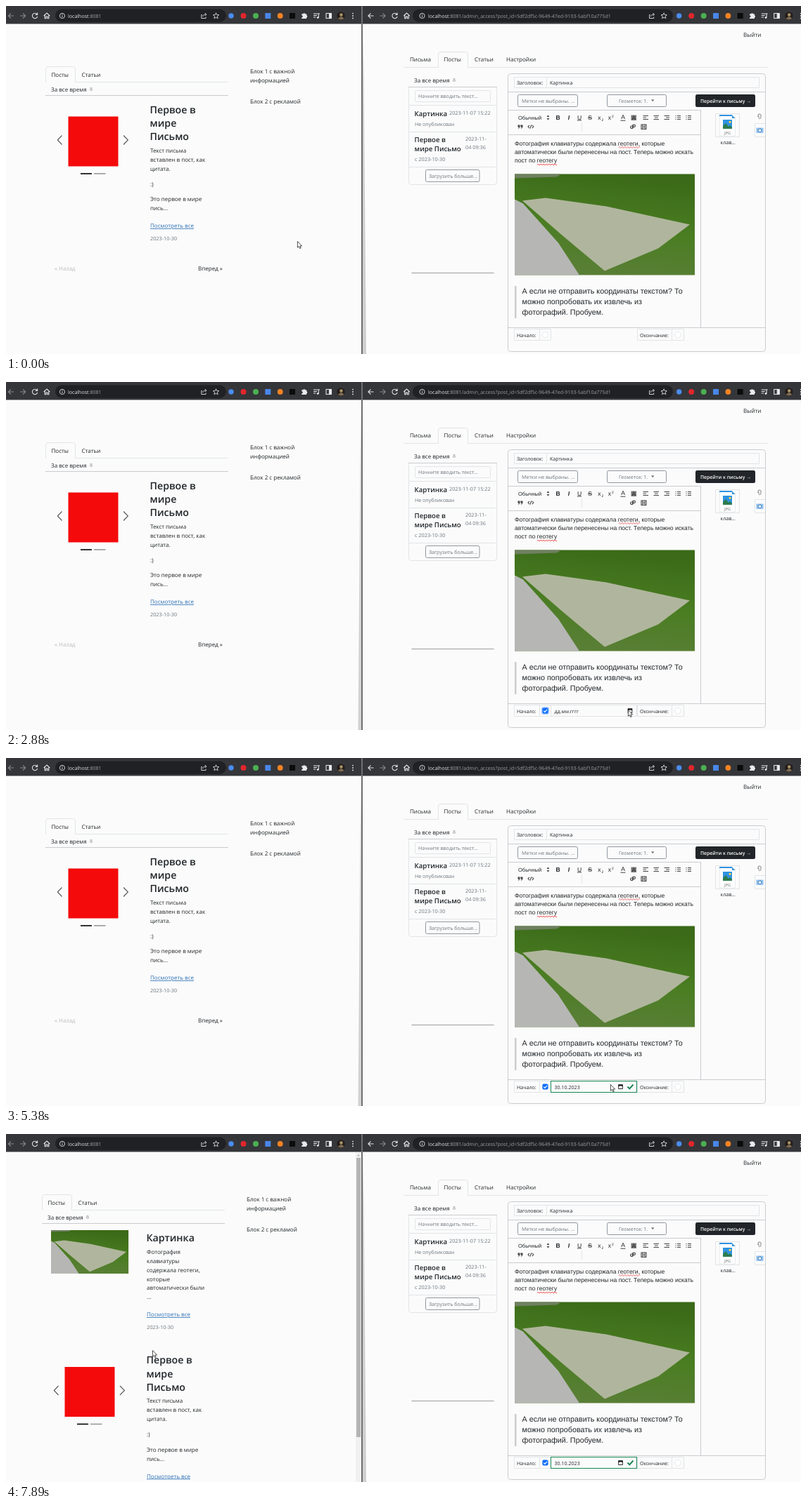
Write an HTML page that moves like this. It is 1130x496 px and loops after 8 s.

```html
<!DOCTYPE html>
<html lang="ru">
<head>
<meta charset="utf-8">
<title>Отложенная публикация</title>
<style>
html, body { margin: 0; width: 100%; height: 100%; overflow: hidden; background: #fbfbfb; }
svg { display: block; width: 1130px; height: 496px; }
text { font: 8.05px "Open Sans", "Noto Sans", sans-serif; fill: #212529; text-rendering: geometricPrecision; white-space: pre; }
.s, .s text { font-size: 7.1px; }
.d { font-size: 7.3px; }
text.g { fill: #6c757d; }
text.off { fill: #b9bcc0; }
.h1 { font-size: 14.2px; font-weight: 600; }
.h2 { font-size: 9.7px; font-weight: 600; }
.link { fill: #2a6fb5; text-decoration: underline; }
.url { font-size: 7.05px; fill: #e8eaed; }
.url tspan { fill: #9aa0a6; }
.dark { font-size: 6.9px; font-weight: 600; fill: #fff; }
.ed { font: 8.6px "Liberation Sans", Arial, sans-serif; }
.q { font: 10.8px "Liberation Sans", Arial, sans-serif; }
.fmt { font-size: 7.5px; }
.sub { font-size: 5px; }
.cal text { font: 6.5px "Liberation Sans", Arial, sans-serif; fill: #111; }
.cal .b { font-weight: 700; }
.cal .act { fill: #1a73e8; }
.mid { text-anchor: middle; }
.ln { fill: none; stroke: #e1e4e8; }
.ln2 { fill: none; stroke: #c9ccd0; }
.btn { fill: none; stroke: #868e96; stroke-width: .9; }
.ic { fill: none; stroke: #dfe1e5; stroke-width: 1.1; }
.thin { stroke-width: .9; }
.dim { stroke: #85888c; }
.tb { fill: none; stroke: #444; stroke-width: 1.1; }

/* every change is a hard step on one 8 s clock */
.cursor, .grid, .flip, .shift, .rightOn, .leftOn, .checked, .ring, .empty, .popup, .done,
.oct, .nov, .loading, .idle, .before, .after { animation: 8s step-end infinite; }
.leftOn { animation-name: leftOn; }
.rightOn { animation-name: rightOn; }
.checked { animation-name: checked; }
.ring { animation-name: ring; }
.empty { animation-name: empty; }
.popup { animation-name: popup; }
.done { animation-name: done; }
.oct { animation-name: oct; }
.nov { animation-name: nov; }
.loading { animation-name: loading; }
.idle { animation-name: idle; }
.before { animation-name: before; }
.after { animation-name: after; }
.shift { animation-name: shift; }
.grid { animation-name: scroll; }
.cal .flip { animation-name: flip; }
.cursor { animation-name: move; }
@keyframes leftOn { 0% { opacity: 1 } 18.125% { opacity: 0 } 77.375%, 100% { opacity: 1 } }
@keyframes rightOn { 0% { opacity: 0 } 18.125% { opacity: 1 } 77.375%, 100% { opacity: 0 } }
@keyframes checked { 0% { opacity: 0 } 18.125%, 100% { opacity: 1 } }
@keyframes ring { 0% { opacity: 0 } 18.125% { opacity: 1 } 39.125%, 100% { opacity: 0 } }
@keyframes empty { 0% { opacity: 0 } 18.125% { opacity: 1 } 64.25%, 100% { opacity: 0 } }
@keyframes popup { 0% { opacity: 0 } 39.125% { opacity: 1 } 64.25%, 100% { opacity: 0 } }
@keyframes done { 0% { opacity: 0 } 64.25%, 100% { opacity: 1 } }
@keyframes nov { 0% { opacity: 1 } 56.375%, 100% { opacity: 0 } }
@keyframes oct { 0% { opacity: 0 } 56.375%, 100% { opacity: 1 } }
@keyframes loading { 0% { opacity: 0 } 84% { opacity: 1 } 93.375%, 100% { opacity: 0 } }
@keyframes idle { 0% { opacity: 1 } 84% { opacity: 0 } 93.375%, 100% { opacity: 1 } }
@keyframes before { 0% { opacity: 1 } 85.5%, 100% { opacity: 0 } }
@keyframes after { 0% { opacity: 0 } 91.875%, 100% { opacity: 1 } }
@keyframes shift { 0% { transform: none } 91.875%, 100% { transform: translate(-5px, 0) } }
@keyframes flip { 0% { fill: var(--a) } 56.375%, 100% { fill: var(--b) } }
@keyframes scroll {
  0% { transform: translate(0, 0) } 56.375% { transform: translate(0, 22.5px) }
  58.25% { transform: translate(0, 60px) } 59.75%, 100% { transform: translate(0, 75.75px) }
}
@keyframes move {
  0% { transform: translate(414px, 335px) }
  1.875% { transform: translate(398px, 324px) }
  3.75% { transform: translate(396px, 321px) }
  5.25% { transform: translate(487px, 343px) }
  7.125% { transform: translate(540px, 366px) }
  8.625% { transform: translate(618px, 401px) }
  10.125% { transform: translate(690px, 436px) }
  11.625% { transform: translate(742px, 460px) }
  13.125% { transform: translate(768px, 468px) }
  21.5% { transform: translate(781px, 468px) }
  23% { transform: translate(803px, 468px) }
  24.875% { transform: translate(850px, 468px) }
  26.375% { transform: translate(872px, 468px) }
  27.875% { transform: translate(882px, 467px) }
  29.375% { transform: translate(884px, 467px) }
  43.875% { transform: translate(878px, 456px) }
  45.375% { transform: translate(850px, 420px) }
  46.875% { transform: translate(815px, 382px) }
  48.375% { transform: translate(795px, 364px) }
  49.875% { transform: translate(789px, 360px) }
  53.25% { transform: translate(789px, 358px) }
  61.25% { transform: translate(788px, 400px) }
  62.75% { transform: translate(786px, 427px) }
  65.75% { transform: translate(826px, 452px) }
  67.25% { transform: translate(859px, 465px) }
  68.75% { transform: translate(861px, 465px) }
  70.625% { transform: translate(744px, 440px) }
  72.125% { transform: translate(609px, 401px) }
  73.875% { transform: translate(520px, 362px) }
  75.5% { transform: translate(445px, 338px) }
  87% { transform: translate(440px, 338px) }
  88.5% { transform: translate(433px, 338px) }
  90.375% { transform: translate(431px, 337px) }
  94.875% { transform: translate(428px, 335px) }
  96.75% { transform: translate(284px, 316px) }
  98.625%, 100% { transform: translate(208px, 308px) }
}
</style>
</head>
<body>
<svg viewBox="0 0 1130 496">
<defs>
  <linearGradient id="hill" x1=".3" y1="1" x2=".5" y2="0">
    <stop offset="0" stop-color="#5b7f38"/><stop offset=".5" stop-color="#4a7d22"/><stop offset="1" stop-color="#3b6a18"/>
  </linearGradient>
  <clipPath id="days"><rect x="778" y="348" width="112" height="91"/></clipPath>
  <clipPath id="card"><rect x="988" y="149" width="91" height="60"/></clipPath>
  <path id="back" d="M11 14H3.5M7 10.3L3.3 14 7 17.7"/>
  <path id="fwd" d="M20 14H27.5M24 10.3L27.7 14 24 17.7"/>
  <path id="reload" d="M44 11.6A3.7 3.7 0 1 0 44.7 14.8M44.6 9.6V12.4H41.8"/>
  <path id="home" d="M53.8 14L58 10l4.2 4M55.2 13V17.8H57V15H59V17.8H60.8V13"/>
  <g id="info" class="thin"><circle cx="80" cy="14" r="3.6"/><path d="M80 13.4V16M80 11.6V12.6"/></g>
  <g id="tools">
    <path class="ic thin" d="M279 12.5H277.8V17.5H284V15.5M279.7 15Q280 12 284.5 12M282.8 10l2 2-2 2"/>
    <path class="ic thin" d="M298.5 9.8l1.2 2.7 2.9.3-2.2 2 .7 2.9-2.6-1.5-2.6 1.5.7-2.9-2.2-2 2.9-.3z"/>
    <circle cx="320" cy="14" r="3.7" fill="#4a8df0"/>
    <circle cx="337.5" cy="14" r="4" fill="#e0262d"/>
    <circle cx="355" cy="14" r="4" fill="#4caf50"/>
    <rect x="368.3" y="10" width="8" height="8" fill="#4a86e8"/>
    <circle cx="389.7" cy="14" r="3.9" fill="#f58220"/>
    <rect x="403" y="10" width="8" height="8" fill="#0b0b0b"/>
    <path fill="#e8eaed" d="M420.3 11.3H422.3A1.6 1.6 0 0 1 425.3 11.3H427.2V13.3A1.5 1.5 0 0 1 427.2 16.2V18H420.3V16.2A1.5 1.5 0 0 0 420.3 13.2Z"/>
    <path class="ic" d="M437 11H444M437 13.5H442M437 16H440.5M444.3 16.5V11H446"/><circle cx="443.3" cy="16.6" r="1.4" fill="#e8eaed"/>
    <rect class="ic" x="455" y="10.5" width="7.5" height="7"/><path fill="#e8eaed" d="M459 10.5H463V17.5H459z"/>
    <circle cx="476" cy="14" r="5.6" fill="#221c16"/><circle cx="476.5" cy="12.6" r="2.3" fill="#a88f6c"/><path fill="#7d6b52" d="M472 17.8Q476.5 13 480.5 17.5Q476.5 21.5 472 17.8Z"/>
    <g fill="#e8eaed"><circle cx="493" cy="10.6" r=".9"/><circle cx="493" cy="14" r=".9"/><circle cx="493" cy="17.4" r=".9"/></g>
  </g>
  <path id="down" fill="none" stroke="#888" stroke-width=".6" d="M-.8 0H.8V2.5H2L0 4.6-2 2.5H-.8Z"/>
  <g id="photo">
    <path fill="url(#hill)" d="M0 0H256V144H0z"/>
    <path fill="#6f8060" d="M0 0H66L60 4 0 6z"/>
    <path fill="#b6b7b4" d="M0 36L12 42 62 98 92 144H0z"/>
    <path fill="#b0b69d" d="M11 38L44 34 130 46 249 72 204 106 128 138 66 86z"/>
  </g>
  <g id="calIcon"><rect x="-2.8" y="-2.3" width="5.6" height="5.2" fill="none" stroke="#111" stroke-width=".9"/><path fill="#111" d="M-3.2-3.2H3.2V-1H-3.2z"/></g>
  <g id="post">
    <text class="h1" x="204.5" y="152.7">Первое в</text>
    <text class="h1" x="204.5" y="172">мире</text>
    <text class="h1" x="204.5" y="191.3">Письмо</text>
    <text x="205" y="208.7">Текст письма</text>
    <text x="205" y="221.7">вставлен в пост, как</text>
    <text x="205" y="234.7">цитата.</text>
    <text x="205" y="256.5">:)</text>
    <text x="205" y="278">Это первое в мире</text>
    <text x="205" y="291">пись...</text>
    <text class="link" x="205" y="316">Посмотреть все</text>
    <text class="d g" x="205" y="333.7">2023-10-30</text>
    <rect x="88.5" y="157.5" width="71" height="71" fill="#f40a0a"/>
    <path fill="none" stroke="#555" stroke-width="1.1" d="M79.5 184.5L73.3 191 79.5 197.5M167 184.5L173.4 191 167 197.5"/>
    <path fill="#000" d="M106 238.2H122V239.8H106z"/><path fill="#999" d="M125 238.2H141.5V239.8H125z"/>
  </g>
</defs>

<!-- visitor window -->
<rect width="1130" height="496" fill="#fbfbfb"/>
<g class="shift">
  <path class="ln" d="M56.5 108.5V90Q56.5 86.5 60 86.5H95Q98.5 86.5 98.5 90V108.5H316"/>
  <path class="ln2" d="M56 127.5H316"/>
  <text x="64.5" y="101">Посты</text><text x="107.5" y="101">Статьи</text>
  <text x="64" y="121.8">За все время</text><use href="#down" x="121" y="116.5"/>
  <text x="347" y="95.8">Блок 1 с важной</text><text x="347" y="108.8">информацией</text>
  <text x="347" y="139">Блок 2 с рекламой</text>
  <g class="before">
    <use href="#post"/>
    <text class="off" x="69" y="377">« Назад</text><text x="273" y="377">Вперед »</text>
  </g>
  <g class="after">
    <use href="#photo" transform="translate(69 137) scale(.43)"/>
    <text class="h1" x="204.5" y="152.7">Картинка</text>
    <text x="205" y="170.5">Фотография</text><text x="205" y="183.5">клавиатуры</text>
    <text x="205" y="196.5">содержала геотеги,</text><text x="205" y="209.5">которые</text>
    <text x="205" y="222.3">автоматически были</text><text x="205" y="235">...</text>
    <text class="link" x="205" y="260">Посмотреть все</text>
    <text class="d g" x="205" y="278">2023-10-30</text>
    <use href="#post" y="174.5"/>
  </g>
</g>
<g class="after">
  <path fill="#f1f1f1" d="M497 25H505V496H497z"/><path fill="#b4b4b4" d="M498 34H504V432H498zM499 31.5L501 29 503 31.5z"/>
</g>

<!-- editor window -->
<text x="1048" y="44">Выйти</text>
<path class="ln" d="M565 87.5H614.5V69Q614.5 65.5 618 65.5H652.5Q656.5 65.5 656.5 69V87.5H1083"/>
<text x="574" y="79">Письма</text><text x="622.5" y="79">Посты</text><text x="666" y="79">Статьи</text><text x="711" y="79">Настройки</text>

<text x="580" y="108.8">За все время</text><use href="#down" x="637" y="103.5"/>
<path class="ln" d="M572.5 115V251Q572.5 254.5 576 254.5H694Q697.5 254.5 697.5 251V115M572.5 141.5H697.5M572.5 179.5H697.5M572.5 229.5H697.5"/>
<path class="ln2" d="M572 115.5H698"/>
<path d="M577 380.5H693" stroke="#b5b5b5" stroke-width="1.5" stroke-linecap="round"/>
<rect class="ln" x="581.5" y="120.5" width="107" height="16" rx="2"/>
<g class="s">
  <text class="g" x="586" y="131.4">Начните вводить текст...</text>
  <text class="g" x="581" y="171">Не опубликован</text>
  <text class="g" x="601" y="245">Загрузить больше...</text>
</g>
<text class="h2" x="580.5" y="156.8">Картинка</text><text class="d g" x="630" y="155">2023-11-07 15:22</text>
<text class="h2" x="580.5" y="194">Первое в</text><text class="h2" x="580.5" y="207">мире Письмо</text>
<text class="d g" x="653" y="192">2023-11-</text><text class="d g" x="653" y="203.6">04 09:36</text>
<text class="d g" x="581" y="221">с 2023-10-30</text>
<rect class="btn" x="596.5" y="233.5" width="76.5" height="17" rx="2"/>

<rect class="ln2" x="713.5" y="96.5" width="366" height="396" rx="4"/>
<path class="ln2" d="M714 122.5H1079.5M714 148.5H987.5V458M714 183.5H987.5M714 458.5H1079.5"/>
<path class="ln" d="M722.5 101.5H1070.5V116.5H722.5zM768.5 101.5V116.5"/>
<g class="s">
  <text x="726" y="112">Заголовок:</text><text x="773" y="112">Картинка</text>
  <text class="g" x="733" y="137.5">Метки не выбраны. ...</text>
  <text class="g" x="871" y="137.5">Геометок: 1.</text>
  <text x="1015.5" y="197.3">клав...</text>
</g>
<path fill="#666" d="M917 133.6H921.5L919.2 136z"/>
<rect class="btn" x="727.5" y="126.5" width="85" height="17" rx="2"/>
<rect class="btn" x="854.5" y="126.5" width="84" height="17" rx="2"/>
<rect x="980" y="126" width="85" height="18" rx="2.5" fill="#212529"/>
<text class="dark" x="987" y="137.5">Перейти к письму →</text>

<text class="ed fmt" x="728" y="161.8">Обычный</text>
<path fill="#444" d="M768.5 158L770.5 155.5 772.5 158zM768.5 160L770.5 162.5 772.5 160z"/>
<text class="ed mid" x="784.5" y="162" style="font-weight:700">B</text>
<text class="ed mid" x="800" y="162" style="font-weight:700;font-style:italic">I</text>
<text class="ed mid" x="815" y="161.5" style="text-decoration:underline">U</text>
<text class="ed mid" x="830" y="162" style="text-decoration:line-through">S</text>
<text class="ed mid" x="843.5" y="162">x</text><text class="ed sub" x="846.5" y="163.5">2</text>
<text class="ed mid" x="858" y="162">x</text><text class="ed sub" x="861" y="158.5">2</text>
<text class="ed mid" x="877" y="161">A</text>
<rect x="888.5" y="155.5" width="7.5" height="7.5" fill="#777"/><text class="ed fmt mid" x="892.2" y="162">A</text>
<path class="tb" d="M873.5 163.3H880.5M905.5 156.5H913M905.5 159H910M905.5 161.5H913M920.5 156.5H928M922 159H926.5M920.5 161.5H928M935.5 156.5H943M938 159H943M935.5 161.5H943M954 156.5H959M954 159H959M954 161.5H959M969 156.5H974M969 159H974M969 161.5H974"/>
<path class="tb" stroke-dasharray="1.2 1.3" d="M952 155.9V162.5M967 155.9V162.5"/>
<path fill="#444" d="M727.5 169.5H730.5V172Q730 174.5 728 175L729 172.5H727.5zM731.5 169.5H734.5V172Q734 174.5 732 175L733 172.5H731.5z"/>
<path class="tb" d="M744 169.8L742 172 744 174.2M747.8 169.8L749.8 172 747.8 174.2M746.8 169.3L745 174.7M889.5 174.5L892.5 169.8"/>
<rect class="tb" x="887.5" y="171" width="4" height="3.5" rx="1.7"/><rect class="tb" x="890.5" y="169" width="4" height="3.5" rx="1.7"/>
<path class="tb" d="M903 169H910V175.5H903zM905 169V175.5M908 169V175.5M905 172.2H908"/>
<path class="ln" d="M818.5 166V179"/>

<g clip-path="url(#card)">
  <path class="ln" d="M1008.5 153.5H1042.5V186.5H1008.5zM1064.5 167.5H1085V186.5H1064.5z"/>
  <path fill="#fff" stroke="#dde1e5" stroke-width=".7" d="M1014.5 155.5H1032L1036.5 160V185H1014.5z"/>
  <path fill="#2f93e0" d="M1014 155H1032L1033 157H1014zM1032 155.5L1036.5 160H1032zM1019 162H1032V175H1019z"/>
  <path fill="#2e7d4f" d="M1019 175V171L1023 167 1027 172 1029 170 1032 173V175z"/><circle cx="1029" cy="165.2" r="1.5" fill="#ffd54a"/>
  <text class="mid" x="1025.5" y="182.5" style="font-size:5.5px;font-weight:600;fill:#888">JPG</text>
  <path fill="none" stroke="#777" stroke-width=".9" d="M1069 158V155Q1071 152.5 1073 155V159.5Q1071 162 1069.8 159.5V156.5"/>
  <rect x="1066.5" y="173.5" width="10" height="7.5" rx="1" fill="#8fc0ea"/><circle cx="1071.5" cy="177.3" r="2.3" fill="#fff" stroke="#3b7fc0"/>
</g>

<text class="ed" x="723" y="199">Фотография клавиатуры содержала геотеги, которые</text>
<text class="ed" x="723" y="211.2">автоматически были перенесены на пост. Теперь можно искать</text>
<text class="ed" x="723" y="223.3">пост по геотегу</text>
<path fill="none" stroke="#e33" stroke-width=".8" d="M871 201.5q1-2 2 0t2 0 2 0 2 0 2 0 2 0 2 0 2 0 2 0 2 0 2 0 2 0 2 0 2 0 2 0M755 226q1-2 2 0t2 0 2 0 2 0 2 0 2 0 2 0 2 0 2 0 2 0 2 0 2 0 2 0 2 0"/>
<use href="#photo" x="723" y="239.5"/>
<path fill="#ccc" d="M723 399H725.5V445H723z"/>
<text class="q" x="733.5" y="410">А если не отправить координаты текстом? То</text>
<text class="q" x="733.5" y="425">можно попробовать их извлечь из</text>
<text class="q" x="733.5" y="440">фотографий. Пробуем.</text>

<path class="ln" d="M722.5 460.5H774.5V476.5H722.5zM758.5 460.5V476.5M897.5 460.5H963.5V476.5H897.5zM946.5 460.5V476.5"/>
<g class="s"><text x="726" y="471.5">Начало:</text><text x="901" y="471.5">Окончание:</text></g>
<g fill="#fff" stroke="#e3e6e9" stroke-width=".8"><rect x="762.5" y="464.5" width="8" height="8" rx="3"/><rect x="951" y="464.5" width="8" height="8" rx="3"/></g>
<rect class="ring" x="761" y="463" width="11" height="11" rx="3" fill="#a9cbfd"/>
<g class="checked">
  <rect x="762.5" y="464.5" width="8" height="8" rx="1.8" fill="#0d6efd"/><path fill="none" stroke="#fff" stroke-width="1.2" d="M764.3 468.6L766 470.3 769 466.8"/>
</g>
<g class="empty s">
  <rect class="ln" x="774.5" y="460.5" width="122" height="16"/>
  <text x="779.5" y="471.5">дд.мм.гггг</text><use href="#calIcon" x="887" y="468.5"/>
</g>
<g class="popup s">
  <rect x="774.5" y="460.5" width="122" height="16" rx="1" fill="none" stroke="#a8c8fb" stroke-width="2.6"/>
  <rect x="779" y="463.5" width="9" height="10.5" fill="#1a6fd4"/><text x="779.5" y="471.5" style="fill:#fff">дд</text>
</g>
<g class="done s">
  <rect x="774.5" y="460.5" width="122" height="16" fill="none" stroke="#198754"/>
  <text x="779.5" y="471.5">30.10.2023</text><use href="#calIcon" x="873.5" y="468.5"/>
  <path fill="none" stroke="#198754" stroke-width="2" d="M883.5 468.5L886.3 471.3 891.5 465.5"/>
</g>

<!-- date picker -->
<g class="cal popup">
  <rect x="774" y="309" width="119" height="153" rx="4" fill="#000" opacity=".14"/>
  <rect x="775" y="308.5" width="116.7" height="151.5" rx="3" fill="#fff" stroke="#c4c4c4" stroke-width=".7"/>
  <text class="b nov" x="780.5" y="323.3">Ноябрь 2023</text><text class="b oct" x="780.5" y="323.3">Октябрь 2023</text>
  <path class="nov" fill="#111" d="M823 319.8H827.4L825.2 322.5z"/><path class="oct" fill="#111" d="M825.5 319.8H829.9L827.7 322.5z"/>
  <path fill="none" stroke="#111" d="M861.5 325.5V317.5M858 321L861.5 317.5 865 321M879 317V325M875.5 321.5L879 325 882.5 321.5"/>
  <g id="week"></g>
  <g clip-path="url(#days)"><g class="grid" id="grid">
    <rect class="nov" x="795.8" y="364.2" width="14.5" height="14" fill="#0075ff" stroke="#101010" stroke-width="1.3"/>
    <rect class="oct" x="795.8" y="364.2" width="14.5" height="14" fill="none" stroke="#767676" stroke-width=".8"/>
    <rect class="oct" x="780.8" y="349" width="14.5" height="14" fill="#0075ff" stroke="#101010" stroke-width="1.3"/>
  </g></g>
  <text class="act" x="786" y="451">Удалить</text><text class="act" x="855" y="451">Сегодня</text>
</g>

<!-- window edges and browser bars -->
<path class="leftOn" fill="#cfcfcf" d="M507 25L508.5 100 512 496H507z"/>
<path class="rightOn" fill="#d3d3d3" d="M505 25L503.5 120 500.5 496H505z"/>
<rect width="1130" height="25.5" fill="#35363a"/>
<path fill="#6f6f72" d="M505 0H507V496H505z"/>
<g fill="#202124"><rect x="70" y="4.5" width="243" height="18.5" rx="9.2"/><rect x="578" y="4.5" width="370" height="18.5" rx="9.2"/></g>
<g class="ic">
  <use href="#back" class="dim"/><use href="#fwd" class="dim"/><use href="#home"/><use href="#info"/>
  <use href="#reload" class="idle"/><path class="loading" d="M38 11L44 17M44 11L38 17"/>
  <g transform="translate(511.5 0)"><use href="#back"/><use href="#fwd" class="dim"/><use href="#reload"/><use href="#home"/><use href="#info"/></g>
</g>
<use href="#tools"/><use href="#tools" x="636.7"/>
<text class="url" x="88" y="16.5">localhost<tspan>:8081</tspan></text>
<text class="url" x="600" y="16.5">localhost<tspan>:8081/admin_access?post_id=5df2df5c-9649-47ed-9103-5abf10a775d1</tspan></text>

<path class="cursor" fill="#fff" stroke="#222" stroke-width=".8" d="M.4.5V9.3L2.4 7.5 3.8 10.6 5.2 10 3.9 7H6.6z"/>
</svg>
<script>
const GREY = '#757575', INK = '#111', WHITE = '#fff';

function label(parent, x, y, str) {
  const el = document.createElementNS('http://www.w3.org/2000/svg', 'text');
  el.setAttribute('class', 'mid');
  el.setAttribute('x', x);
  el.setAttribute('y', y);
  el.textContent = str;
  document.getElementById(parent).append(el);
  return el;
}

const colX = col => 788 + 15.1 * col;
['Пн', 'Вт', 'Ср', 'Чт', 'Пт', 'Сб', 'Вс'].forEach((d, i) => label('week', colX(i), 343, d));

// Eleven weeks from 25 September; the November view starts at the sixth row
for (let i = 0; i < 77; i++) {
  const date = new Date(Date.UTC(2023, 8, 25 + i));
  const day = date.getUTCDate(), month = date.getUTCMonth();
  const el = label('grid', colX(i % 7), 358.4 + 15.15 * (Math.floor(i / 7) - 5), day);
  let a = month === 10 ? INK : GREY, b = month === 9 ? INK : GREY;
  if (month === 10 && day === 7) a = WHITE;
  if (month === 9 && day === 30) b = WHITE;
  el.classList.add('flip');
  el.style.setProperty('--a', a);
  el.style.setProperty('--b', b);
}
</script>
</body>
</html>
```
